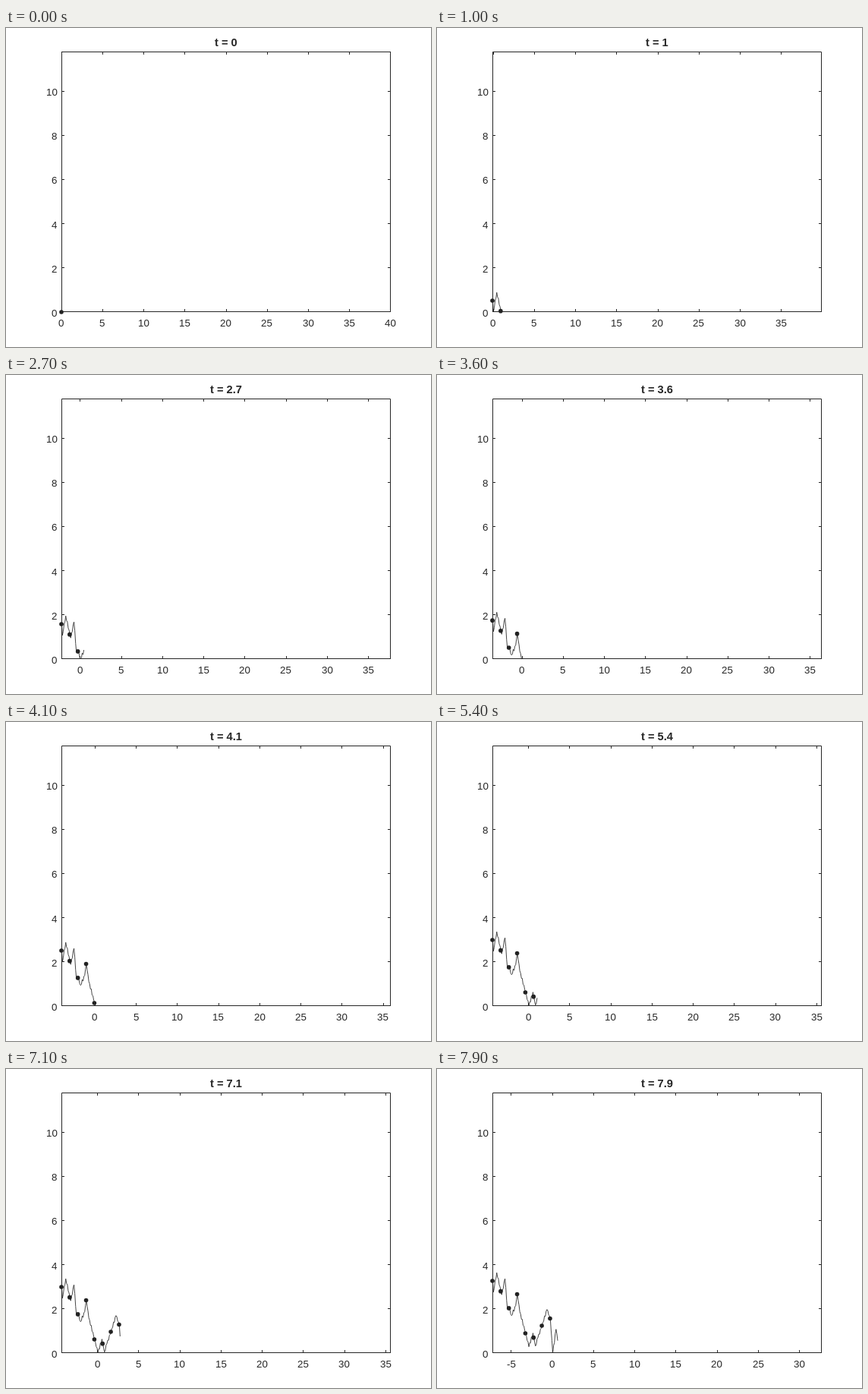
These frames come from a looping animation (560x420 px, 8000 ms). An HTML page with a canvas:

```html
<!DOCTYPE html>
<html lang="en">
<head>
<meta charset="utf-8">
<title>Random walk above its running minimum</title>
<style>
html, body { margin: 0; width: 100%; height: 100%; overflow: hidden; background: #fff; }
canvas { display: block; width: 560px; height: 420px; }
</style>
</head>
<body>
<canvas id="stage" width="560" height="420"></canvas>
<script>
const ctx = document.getElementById('stage').getContext('2d');
const INK = '#262626';
const FONT = '"Liberation Sans", Arial, sans-serif';
const LEFT = 73, RIGHT = 507, TOP = 31, BOTTOM = 374, BASE = 373.7;
const UNIT_X = 10.85, UNIT_Y = 29.05;
const STEP_MS = 100, STEPS = 80, TICK = 4, JITTER = 2.4;

// Main turning points of the walk: [step, height in pixels]
const turns = [
  [0, 0], [1, -15], [5, 10.5], [11, -18.5], [15, 2.5], [18, -37.5],
  [20, -35.9], [23, -46], [28, -33], [30, -17.5], [33, -41], [41, -73],
  [44, -87], [49, -69], [52, -86], [55, -75], [60, -59], [66, -38],
  [70, -49.5], [73, -95], [77, -64], [79, -79]
];

// Straight runs between turns, roughened by an alternating jitter
function height(step) {
  const n = Math.max(1, turns.findIndex(turn => turn[0] >= step));
  const [s0, h0] = turns[n - 1], [s1, h1] = turns[n];
  const u = (step - s0) / (s1 - s0);
  return h0 + (h1 - h0) * u - JITTER * 4 * u * (1 - u) * Math.sin(1.1 * Math.PI * step);
}

const walk = Array.from({ length: STEPS }, (_, i) => height(i));

function lowestIndex(last) {
  let low = 0;
  for (let i = 1; i <= last; i++) if (walk[i] < walk[low]) low = i;
  return low;
}

// align: 0.5 centres the text on x, 1 ends it there; glyphs start on whole pixels
function label(text, x, y, align, font = '13.333px ') {
  ctx.font = font + FONT;
  ctx.fillText(text, Math.floor(x - ctx.measureText(text).width * align), y);
}

function segment(x1, y1, x2, y2) {
  ctx.moveTo(x1, y1);
  ctx.lineTo(x2, y2);
}

function drawAxes(origin) {
  const left = LEFT + 0.5, right = RIGHT - 0.5, top = TOP + 0.5, bottom = BOTTOM - 0.5;
  ctx.strokeStyle = ctx.fillStyle = INK;
  ctx.lineWidth = 1;
  ctx.beginPath();
  ctx.rect(left, top, right - left, bottom - top);
  for (let v = -5; v <= 40; v += 5) {
    const pos = v + origin;
    if (pos < 0 || pos > 40) continue;
    const x = LEFT + pos * UNIT_X;
    const px = Math.min(Math.floor(x) + 0.5, right);
    segment(px, BOTTOM, px, BOTTOM - TICK);
    segment(px, TOP, px, TOP + TICK);
    label(String(v), x, 393, 0.5);
  }
  for (let v = 0; v <= 10; v += 2) {
    const y = BASE - v * UNIT_Y;
    const py = Math.floor(y) + 0.5;
    segment(LEFT, py, LEFT + TICK, py);
    segment(RIGHT, py, RIGHT - TICK, py);
    label(String(v), 68, Math.round(y + 6.05), 1);
  }
  ctx.stroke();
}

function draw(step) {
  const low = lowestIndex(step);
  const xAt = i => LEFT + i * UNIT_X / 10;
  const yAt = i => BASE - (walk[i] - walk[low]);

  ctx.fillStyle = '#fff';
  ctx.fillRect(0, 0, 560, 420);

  ctx.beginPath();
  for (let i = 0; i <= step; i++) ctx.lineTo(xAt(i) + 0.3, yAt(i));
  ctx.strokeStyle = '#333';
  ctx.lineWidth = 0.9;
  ctx.lineJoin = 'round';
  ctx.stroke();

  drawAxes(low / 10);
  label('t = ' + step / 10, 290.4, 24, 0.5, 'bold 14.667px ');

  ctx.fillStyle = '#222';
  for (let i = 0; i <= step; i += 10) {
    ctx.beginPath();
    ctx.arc(xAt(i), yAt(i) + 0.3, 2.8, 0, Math.PI * 2);
    ctx.fill();
  }
}

const start = performance.now();
function frame() {
  const elapsed = performance.now() - start;
  draw(Math.floor(elapsed / STEP_MS) % STEPS);
  requestAnimationFrame(frame);
}
frame();
</script>
</body>
</html>
```
